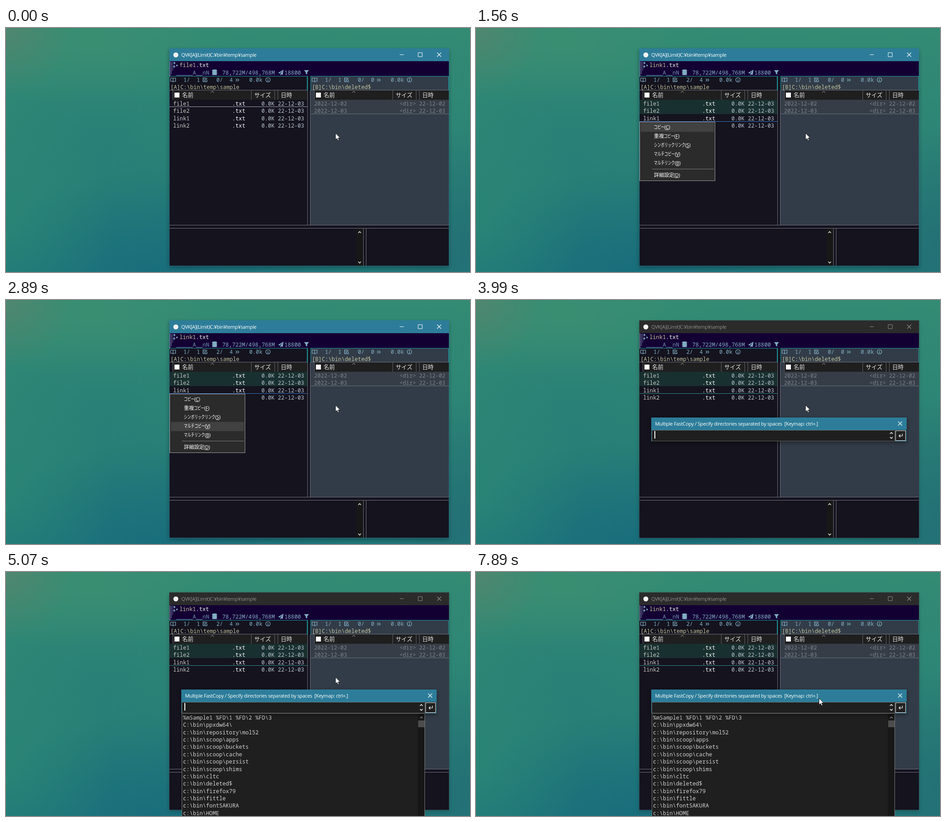
Animation, 1030 px wide and 544 px high, one loop 8 s. Source, as an HTML page:

```html
<!DOCTYPE html>
<html lang="ja">
<head>
<meta charset="utf-8">
<title>File manager</title>
<style>
html, body { margin: 0; width: 100%; height: 100%; overflow: hidden; }
body {
  background:
    radial-gradient(circle at 0 0, #56846ecc 0, #56846e00 150px),
    radial-gradient(ellipse 320px 150px at 190px 30px, #3f917090, #3f917000),
    radial-gradient(ellipse 240px 260px at 0 430px, #2f8c7488, #2f8c7400),
    radial-gradient(ellipse 260px 170px at 220px 240px, #267b7880, #267b7800),
    radial-gradient(ellipse 420px 250px at 350px 560px, #176b7dd0, #176b7d00),
    radial-gradient(ellipse 220px 260px at 1030px 480px, #256b73a0, #256b7300),
    linear-gradient(#338b74, #2c8475 45%, #207779);
}
svg { display: block; width: 100%; height: 100%; }
text { white-space: pre; }
.mono { font: 12.17px "Noto Sans Mono", "DejaVu Sans Mono", monospace; }
.ui { font: 11px "Open Sans", "Noto Sans", sans-serif; letter-spacing: -.33px; }
.jp { font: 12.6px "Noto Sans CJK JP", "Noto Sans CJK", sans-serif; }
.menu { font: 11.2px "Noto Sans CJK JP", "Noto Sans CJK", sans-serif; }
</style>
</head>
<body>
<svg id="stage" viewBox="0 0 1030 544" xmlns="http://www.w3.org/2000/svg"></svg>
<script>
const ACCENT = '#2d7d9a', DARK = '#14131e', SLATE = '#323c48', LINE = '#73727f',
      CYAN = '#1f979f', BLUE = '#83aec4', KHAKI = '#c4c39a', EDIT = '#1f1f1f';
const ROW = 16.36, LOOP = 8000;

const esc = s => s.replace(/&/g, '&amp;').replace(/</g, '&lt;');
const rect = (x, y, w, h, fill, more = '') =>
  `<rect x="${x}" y="${y}" width="${w}" height="${h}" fill="${fill}" ${more}/>`;
const frame = (x, y, w, h, fill, stroke, more = '') =>
  rect(x + .5, y + .5, w - 1, h - 1, fill, `stroke="${stroke}" ${more}`);
const label = (x, y, s, fill, cls = 'mono', more = '') =>
  `<text x="${x}" y="${y}" fill="${fill}" class="${cls}" ${more}>${esc(s)}</text>`;
const path = (x, y, d, stroke, width = 1, fill = 'none') =>
  `<path transform="translate(${x} ${y})" d="${d}" fill="${fill}" stroke="${stroke}" stroke-width="${width}"/>`;
const group = (id, body) => `<g id="${id}">${body}</g>`;
const shadow = (id, x, y, w, h, opacity) =>
  rect(x, y, w, h, '#000', `id="${id}" opacity="${opacity}" filter="url(#blur)"`);

const CROSS = 'M-4.5-4.5l9 9M4.5-4.5l-9 9';
const UP = 'M-3 2l3-3 3 3', DOWN = 'M-3-2l3 3 3-3';
const solid = (x, y, d) => path(x, y, d, 'none', 0, BLUE);

function infoBand() {
  let s = rect(363, 74, 620, 33, '#130033');
  // dotted edge that thins out to the right
  for (let col = 0; col < 4; col++)
    for (let row = 0; row < 11 - col * 2; row++)
      s += rect(363 + col * 3, 75 + row * 3 + col % 2, 2, 2, '#9bb5d6', `opacity="${.8 - col * .18}"`);
  const star = r => `M0-${r}L1-1 ${r} 0 1 1 0 ${r}-1 1-${r} 0-1-1z`;
  s += solid(374, 78, star(3)) + solid(379.5, 83.5, star(2.5)) + solid(373.5, 86, star(3));
  s += `<text y="87" x="385" class="mono"><tspan id="name" fill="${KHAKI}"></tspan><tspan fill="#f4f4f4">.txt</tspan></text>`;
  s += label(378, 103.5, '_____A__nN', '#7097b0') + label(480, 103.5, '78,722M/498,768M', BLUE)
     + label(618, 103.5, '18800', BLUE);
  for (const y of [94, 98, 102])
    s += solid(463, y, 'M-5.5 0C-5.5-2 5.5-2 5.5 0V1.5C5.5 3.5-5.5 3.5-5.5 1.5z');
  s += solid(610, 99, 'M6-6L-6 1-2.5 2.5 4-4-1 3.5V6.5L1.2 4.3 4.2 5.5z');
  return s + solid(667, 99, 'M-5.5-5h11L1.5 0V5L-1.5 3V0z');
}

function paneHead(x, bg, folder, total, id) {
  let s = rect(x, 107, 306, 32, bg);
  s += path(x + 8, 115.5, 'M-5.5-4h4L0-3 1.5-4h4v7.5h-4L0 4.5-1.5 3.5h-4zM0-3v7', BLUE, 1.2);
  s += path(x + 79, 115.5, 'M4 0v4h-8.5v-8H2M-2.5-1l2 2.5 5-5.5', BLUE, 1.3);
  s += path(x + 151, 116, 'M-4-3l3 3-3 3M0-3l3 3-3 3', BLUE, 1.2);
  s += `<circle cx="${x + 218.5}" cy="115.5" r="5" fill="none" stroke="${BLUE}" stroke-width="1.2"/>`
     + path(x + 218.5, 115.5, 'M0-3v1.3M-1-.5h1v3M-1.3 2.5h2.6', BLUE, 1.1);
  s += label(x + 31, 120, '1/  1', BLUE)
     + `<text id="${id}" x="${x + 104}" y="120" class="mono" fill="${BLUE}">0/  ${total}</text>`
     + label(x + 177, 120, '0.0k', BLUE);
  return s + label(x + 2, 136, folder, KHAKI);
}

function columns(x) {
  let s = rect(x + 7, 139, 299, 21, '#1f1f20') + rect(x + 11, 144, 11, 11, '#fff');
  s += rect(x, 138, 306, 1, LINE);
  for (const dx of [7, 181, 233, 240]) s += rect(x + dx, 139, 1, 21, '#62626a');
  return s + path(x + 95, 142, 'M-3.5 2l3.5-3 3.5 3', '#aaa')
    + label(x + 28, 154, '名前', '#e4e4e4', 'jp') + label(x + 188, 154, 'サイズ', '#e4e4e4', 'jp')
    + label(x + 247, 154, '日時', '#e4e4e4', 'jp');
}

function leftPane() {
  let s = paneHead(363, DARK, '[A]C:\\bin\\temp\\sample', 4, 'marks') + columns(363);
  s += rect(363, 160, 306, 16, '#18302f', 'id="mark0"') + rect(363, 176, 306, 16, '#18302f', 'id="mark1"');
  ['file1', 'file2', 'link1', 'link2'].forEach((name, i) => {
    const y = 173 + i * ROW;
    s += label(371, y, name, '#c9c7c4') + label(502, y, '.txt', '#fff')
       + label(567, y, '0.0K', '#b9c3cf') + label(603.5, y, '22-12-03', '#b9c3cf');
  });
  return s + rect(363, 175, 306, 1, '#a9a4bd', 'id="bar"');
}

function rightPane() {
  let s = rect(676, 107, 307, 332, SLATE) + paneHead(677, SLATE, '[B]C:\\bin\\deleted$', 0, 'marksB');
  s += columns(677) + rect(677, 160, 306, 31, '#363d47') + rect(677, 191, 306, 1, '#697885');
  ['02', '03'].forEach((day, i) => {
    const y = 173 + i * ROW;
    s += label(684, y, '2022-12-' + day, '#7d8389') + label(873.5, y, '<dir>', '#7d8389')
       + label(917, y, '22-12-' + day, '#7d8389');
  });
  return s;
}

function mainWindow() {
  let s = shadow('shade', 362, 49, 621, 485, .32) + rect(363, 46, 620, 484, DARK);
  s += rect(363, 46, 620, 28, ACCENT, 'id="bartop"');
  s += '<circle cx="377" cy="60" r="5.5" fill="#f4f4f4"/>';
  s += group('caption', label(389, 64, 'QVK[A](Limit)C:¥bin¥temp¥sample', 'currentColor', 'ui')
    + path(879, 60, 'M-5-.5h9', 'currentColor') + path(919.5, 59.5, 'M-4.5-4.5h9v9h-9z', 'currentColor')
    + path(961.5, 59.5, CROSS, 'currentColor', 1.1));
  s += infoBand() + leftPane() + rightPane();
  s += rect(363, 107, 307, 1, CYAN) + rect(676, 107, 307, 1, CYAN);
  s += rect(669, 139, 1, 300, LINE) + rect(675, 139, 1, 300, LINE);
  s += rect(668, 107, 2, 32, CYAN) + rect(676, 107, 1, 32, CYAN) + rect(982, 107, 1, 32, CYAN);
  s += rect(363, 439, 620, 1, LINE) + rect(363, 446, 620, 1, LINE);
  s += rect(778, 447, 15, 83, '#171717') + rect(793, 447, 1, 83, LINE) + rect(799, 447, 1, 83, LINE);
  s += path(785, 455, UP, '#e0e0e0', 1.6) + path(785, 523, DOWN, '#e0e0e0', 1.6);
  return s + frame(362, 45, 622, 486, 'none', ACCENT, 'id="edge" stroke-opacity=".65"');
}

function menuItem(y, kanji, kana, key) {
  const x1 = 395 + kanji.length * 11, x2 = x1 + kana.length * 7.7;
  return label(395, y, kanji, '#fff', 'menu')
    + label(0, 0, kana, '#fff', 'menu', `transform="translate(${x1} ${y}) scale(.69 1.04)"`)
    + `<text x="${x2}" y="${y}" class="ui" fill="#fff">(<tspan text-decoration="underline">${key}</tspan>)</text>`;
}

function menu() {
  let s = frame(363, 209, 168, 132, '#2b2b2b', '#a0a0a0') + rect(366, 211, 162, 20.5, '#414141', 'id="pick"');
  [['', 'コピー', 'C'], ['重複', 'コピー', 'F'], ['', 'シンボリックリンク', 'S'],
   ['', 'マルチコピー', 'V'], ['', 'マルチリンク', 'B']]
    .forEach((item, i) => s += menuItem(225 + i * 20.1, ...item));
  return s + rect(391, 314, 137, 1, '#808080') + menuItem(332, '詳細設定', '', 'D');
}

function dropList() {
  let s = frame(390, 315, 540, 240, EDIT, '#7a7a7a');
  s += rect(914, 316, 15, 228, '#171717') + rect(915, 331, 14, 15, '#4d4d4d');
  s += path(922, 324, UP, '#858585', 1.5);
  const dirs = ['repository\\mol52', 'scoop\\apps', 'scoop\\buckets', 'scoop\\cache', 'scoop\\persist',
    'scoop\\shims', 'cltc', 'deleted$', 'firefox79', 'fittle', 'fontSAKURA', 'HOME'];
  ['%mSample1 %FD\\1 %FD\\2 %FD\\3', 'C:\\bin\\ppxdw64\\', ...dirs.map(d => 'c:\\bin\\' + d)]
    .forEach((line, i) => s += label(393, 329 + i * ROW, line, '#d2d2d2'));
  return s;
}

function dialog() {
  let s = shadow('shade2', 389, 265, 567, 53, .4) + frame(389, 262, 567, 53, EDIT, ACCENT);
  s += rect(389, 262, 567, 28, ACCENT);
  s += label(397.5, 280, 'Multiple FastCopy / Specify directories separated by spaces  [Keymap: ctrl+.]', '#fff', 'ui');
  s += path(941.5, 275.5, CROSS, '#fff', 1.1) + frame(390, 290, 540, 25, EDIT, '#626262');
  s += path(922, 296.5, UP, '#eee', 1.6) + path(922, 307.5, DOWN, '#eee', 1.6);
  s += frame(931, 291, 23, 23, '#202020', '#eee');
  s += path(942.5, 302, 'M4-4v5h-7M-.5-2l-3 3 3 3', '#fff', 1.2);
  return s + rect(396, 292, 2, 17, '#fff', 'id="caret"');
}

const stage = document.getElementById('stage');
stage.innerHTML = '<defs><filter id="blur" x="-20%" y="-30%" width="140%" height="160%">'
  + '<feGaussianBlur stdDeviation="5"/></filter></defs>'
  + mainWindow() + group('menu', menu()) + group('list', dropList()) + group('dialog', dialog())
  + group('mouse', path(0, 0, 'M.5.5V15L3.8 11.9 6 17 8.3 16 6.2 11H10.7z', '#111', .9, '#fff'));

const el = id => document.getElementById(id);
const set = (id, attr, value) => el(id).setAttribute(attr, value);
const show = (id, on) => set(id, 'visibility', on ? 'visible' : 'hidden');
const count = (t, times) => times.filter(at => t >= at).length;

const BLINKS = [4510, 5070, 5600, 6160, 6720, 7270, 7830];
const PICKS = [2450, 2670, 2890];
// time, x, y of the pointer
const MOVES = [[0, 731, 234], [6270, 717, 241], [6370, 699, 250], [6510, 695, 259], [6620, 690, 268],
  [6720, 687, 274], [6830, 685, 278], [6930, 684, 280], [7270, 684, 281], [7350, 688, 281],
  [7460, 703, 281], [7570, 723, 281], [7680, 743, 281], [7790, 756, 281], [7890, 761, 281]];

function draw(t) {
  const marked = count(t, [500, 800]);
  const active = t < 3990;
  el('name').textContent = ['file1', 'file2', 'link1'][marked];
  el('marks').textContent = marked + '/  4';
  show('mark0', marked > 0);
  show('mark1', marked > 1);
  set('bar', 'y', [175, 191, 208][marked]);
  set('bar', 'fill', !active ? '#348f94' : t < 1560 ? '#a9a4bd' : '#3a78c4');

  set('bartop', 'fill', active ? ACCENT : '#2b2b2b');
  set('edge', 'stroke', active ? ACCENT : '#3a3a40');
  set('caption', 'color', active ? '#fff' : '#8f8f8f');
  set('shade', 'opacity', active ? .32 : .2);

  show('menu', t >= 1560 && active);
  set('pick', 'y', 211 + count(t, PICKS) * 20.25);
  show('dialog', !active);
  show('list', t >= 4080);
  show('caret', !active && count(t, BLINKS) % 2 === 0);

  const [, x, y] = MOVES[count(t, MOVES.map(m => m[0])) - 1];
  set('mouse', 'transform', `translate(${x} ${y})`);
}

const start = performance.now();
function tick() {
  draw((performance.now() - start) % LOOP);
  requestAnimationFrame(tick);
}
draw(0);
requestAnimationFrame(tick);
</script>
</body>
</html>
```
